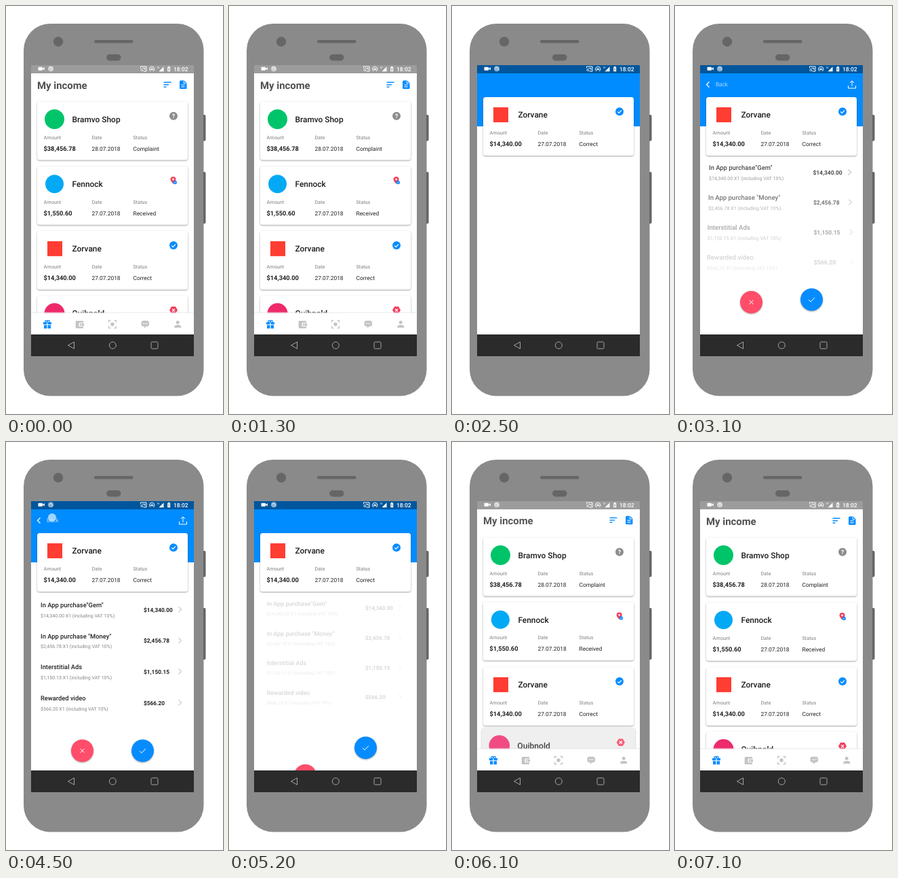
Write an HTML page that moves like this. It is 320 px wide and 600 px high and loops after 7800 ms.

```html
<!DOCTYPE html>
<html lang="en">
<head>
<meta charset="utf-8">
<title>Income app</title>
<style>
  html, body { margin: 0; width: 100%; height: 100%; overflow: hidden; background: #fff; }
  svg { display: block; width: 100%; height: 100%; }
  text { font-family: Roboto, "Noto Sans", sans-serif; text-rendering: geometricPrecision; fill: #222; }
  .shadow { filter: drop-shadow(0 1.1px 1.1px rgba(0, 0, 0, .36)); }
  .heading { font-size: 14.9px; font-weight: 700; fill: #505050; }
  .name { font-size: 11.9px; font-weight: 500; fill: #1c1c1c; }
  .label { font-size: 7.3px; fill: #808080; }
  .amount { font-size: 9.25px; font-weight: 700; }
  .value { font-size: 8.4px; }
  .item { font-size: 9.35px; font-weight: 500; }
  .sub { font-size: 7.05px; fill: #858585; }
  .price { font-size: 8.35px; font-weight: 700; }
</style>
</head>
<body>
<svg viewBox="0 0 320 600">
  <defs><clipPath id="screen"><rect x="37" y="87" width="240" height="428"/></clipPath></defs>

  <rect x="26" y="26" width="265.5" height="547.5" rx="39" fill="#8a8a8a"/>
  <g fill="#666">
    <path d="M291 160h1.5q2 0 2 2v34.500q0 2-2 2H291zM291 244h1.500q2 0 2 2v72q0 2-2 2H291z"/>
    <circle cx="77" cy="52.500" r="7.200"/>
    <rect x="130" y="50" width="57.500" height="4.500" rx="2.250"/>
    <rect x="148" y="71" width="21.500" height="9.500" rx="4.750"/>
  </g>

  <g clip-path="url(#screen)">
    <rect x="37" y="87" width="240" height="428" fill="#fff"/>
    <g id="header">
      <text class="heading" x="46" y="121.500">My income</text>
      <path d="M232.500 112.300h11M232.500 115.700h7.500M232.500 119.100h4" stroke="#0a8cff" stroke-width="1.500"/>
      <path d="M257.500 109.500h5l4 4v7q0 1.500-1.500 1.500h-7.500q-1.500 0-1.500-1.500v-9.500q0-1.500 1.500-1.500z" fill="#0a8cff"/>
      <path d="M258.500 116h5M258.500 118.800h5M262.200 110.500v3.200h3.200" stroke="#fff" fill="none"/>
    </g>
    <g id="list"></g>

    <g id="tabs">
      <path d="M37 451h240" stroke="#e2e2e2"/>
      <rect x="37" y="451.500" width="240" height="33" fill="#fff"/>
      <g fill="#0a8cff">
        <path d="M55 465h5.400v3.200H55zM61.600 465H67v3.200h-5.400zM56 469.200h4.400v5H56zM61.600 469.200H66v5h-4.400z"/>
        <g fill="none" stroke="#0a8cff" stroke-width="1.200">
          <circle cx="59.200" cy="463.800" r="1.500"/>
          <circle cx="62.800" cy="463.800" r="1.500"/>
        </g>
      </g>
      <g fill="#c4c4c4">
        <path d="M104 463h10v2.500h-5q-1.500 0-1.500 1.500v3q0 1.500 1.500 1.500h5v2.500h-10q-1.300 0-1.300-1.300v-8.400q0-1.300 1.300-1.300zM109 466.500h6v4h-6z"/>
        <circle cx="111.200" cy="468.500" r=".9" fill="#fff"/>
        <circle cx="157" cy="468" r="2.700"/>
        <path d="M151.500 465.500v-3h3M159.500 462.500h3v3M162.500 470.500v3h-3M154.500 473.500h-3v-3" fill="none" stroke="#c4c4c4" stroke-width="1.300"/>
        <path d="M203 462.700h4.500q3.700 0 3.700 4.300t-3.700 4.300h-1l-2.500 2.700v-2.700h-1q-3.700 0-3.700-4.300t3.700-4.300z"/>
        <path d="M202 467h1.300M204.600 467h1.300M207.200 467h1.300" stroke="#fff" stroke-width="1.300"/>
        <circle cx="253.200" cy="465.300" r="2.500"/>
        <path d="M248.200 473v-1.300q0-2.700 5-2.700t5 2.700v1.300z"/>
      </g>
    </g>

    <rect id="panel" x="37" y="87" width="240" fill="#008cff"/>
    <g id="detailHeader">
      <path d="M50.500 111.500l-4 4 4 4" fill="none" stroke="#fff" stroke-width="1.200"/>
      <text x="60" y="118.300" font-size="8.200" style="fill:#fff;font-weight:300">Back</text>
      <path d="M255.500 117v4h11v-4M261 118v-8M258 113l3-3 3 3" fill="none" stroke="#fff"/>
    </g>
    <g id="rows"></g>
    <g id="reject" class="shadow">
      <circle cx="112.500" r="16.500" fill="#ff4d6a"/>
      <path d="M109.500-3l6 6M115.500-3l-6 6" stroke="#fff"/>
    </g>
    <g id="accept" class="shadow">
      <circle cx="201.500" r="16.500" fill="#078cff"/>
      <path d="M197 .300l3 3 6-6.300" fill="none" stroke="#fff"/>
    </g>
    <g id="selected"></g>
    <circle id="touch" cx="68" cy="111" r="6" fill="#d5ecff" opacity=".75"/>

    <rect x="37" y="87" width="240" height="12" fill="#000" opacity=".39"/>
    <g fill="#fff">
      <rect x="47.500" y="89.700" width="6.500" height="5" rx=".7"/>
      <path d="M54 92l2.800-2v4.400L54 92.500z"/>
      <circle cx="66" cy="92.300" r="4" opacity=".55"/>
      <path d="M63.500 91.500q2.500-2.500 4.500 0t.5 3" fill="none" stroke="#fff" opacity=".6"/>
      <g fill="none" stroke="#fff" stroke-width="1">
        <path d="M198.500 91v-2h8.500v7h-4M198.500 92.500q3.500 0 3.500 3.500M198.500 94.500q1.500 0 1.500 1.500M201.500 91.500h3.500v2.500"/>
        <path d="M213 96q-3-3.200-.5-5.800 2.700-2.300 5.400 0 2.500 2.600-.5 5.800M213.700 94q-.8-2 1.500-2.300 2.300.3 1.500 2.300"/>
      </g>
      <circle cx="215.200" cy="93.500" r="1"/>
      <path d="M225.500 96.200l7-7v7zM238.200 89.800h1v-1h2v1h1v6.500h-4z"/>
      <text x="223" y="91.800" font-size="4.500" style="fill:#fff">H</text>
      <path d="M240.700 90.700l-1.300 2.300h1.600l-1.300 2.300" fill="none" stroke="#777" stroke-width=".7"/>
      <text x="247" y="95.500" font-size="8.500" style="fill:#fff;font-weight:500">18:02</text>
    </g>

    <rect x="37" y="483" width="240" height="32" fill="#2b2b2b"/>
    <g fill="none" stroke="#a5a5a5">
      <path d="M100.500 494v10l-9-5z" stroke-linejoin="round"/>
      <circle cx="157.300" cy="499" r="5"/>
      <rect x="214" y="494" width="10" height="10" rx="1.500"/>
    </g>
  </g>
</svg>

<script>
const LOOP = 7800, STEP = 100, CENTER = 157;
const CARD_TOP = 140.5, CARD_PITCH = 95.2, DETAIL_TOP = 134;
const ROW_TOP = 243, ROW_PITCH = 45.7;
const $ = id => document.getElementById(id);

const badges = {
  Complaint: `<circle r="6" fill="#8c8c8c"/>
    <text y="3.200" font-size="9" text-anchor="middle" style="fill:#fff;font-weight:700">?</text>`,
  Received: `<path d="M-.5 4.500q-4-4.500-4-6.500a4 4 0 0 1 8 0q0 2-4 6.500z" fill="#f2405f"/>
    <circle cx="-.5" cy="-2" r="1.300" fill="#fff"/><circle cx="2.300" cy="2.500" r="2.700" fill="#0a8cff"/>
    <path d="M1 2.500l1 1 1.700-1.800" fill="none" stroke="#fff" stroke-width=".7"/>`,
  Correct: `<circle r="6" fill="#078cff"/><path d="M-2.800 .2l2 2 3.800-4" fill="none" stroke="#fff" stroke-width="1.200"/>`,
  Rejected: `<path d="M-3-5.200h6l3 5.200-3 5.200h-6l-3-5.200z" fill="#f2405f"/>
    <path d="M-2-2l4 4M2-2l-4 4" stroke="#fff" stroke-width="1.200"/>`
};

const circle = (r, color) => `<circle cx="71.500" cy="26" r="${r}" fill="${color}"/>`;
const square = (size, color) =>
  `<rect x="${72 - size / 2}" y="${26 - size / 2}" width="${size}" height="${size}" fill="${color}"/>`;

const incomes = [
  ['Bramvo Shop', '$38,456.78', '28.07.2018', 'Complaint', circle(14.5, '#00c46a')],
  ['Fennock', '$1,550.60', '27.07.2018', 'Received', circle(13.5, '#03a9f4')],
  ['Zorvane', '$14,340.00', '27.07.2018', 'Correct', square(22, '#ff3d32')],
  ['Quibnold', '$2,120.00', '26.07.2018', 'Rejected', circle(15, '#ee2a6b')]
];

function cardMarkup([name, amount, date, status, logo]) {
  const column = (x, label, value, kind) =>
    `<text class="label" x="${x}" y="55">${label}</text><text class="${kind}" x="${x}" y="72">${value}</text>`;
  return `<rect class="shadow" x="46" width="222" height="86" rx="3.500" fill="#fff"/>${logo}
    <text class="name" x="97.500" y="30.400">${name}</text>
    <g transform="translate(247 21.200)">${badges[status]}</g>
    ${column(55.5, 'Amount', amount, 'amount')}
    ${column(126.5, 'Date', date, 'value')}
    ${column(187.5, 'Status', status, 'value')}`;
}

const purchases = [
  ['In App purchase"Gem"', '$14,340.00'],
  ['In App purchase "Money"', '$2,456.78'],
  ['Interstitial Ads', '$1,150.15'],
  ['Rewarded video', '$566.20']
];

const rowMarkup = ([title, price]) => `<g>
  <text class="item" x="51" y="0">${title}</text>
  <text class="sub" x="51" y="14.700">${price} X1 (including VAT 10%)</text>
  <text class="price" x="203" y="6.600">${price}</text>
  <path d="M254.500-.800l4 4-4 4" fill="none" stroke="#aaa"/></g>`;

$('list').innerHTML = incomes.map((income, i) => i === 2 ? '<g></g>' : `<g>${cardMarkup(income)}</g>`).join('');
$('selected').innerHTML = cardMarkup(incomes[2]);
$('rows').innerHTML = purchases.map(rowMarkup).join('');
const cards = [...$('list').children], rows = [...$('rows').children];

const ramp = (t, start, duration) => Math.min(1, Math.max(0, (t - start) / duration));
const sine = p => (1 - Math.cos(Math.PI * p)) / 2;
const quadOut = p => 1 - (1 - p) ** 2;
const backOut = p => 1 + 5.5 * (p - 1) ** 3 + 4.5 * (p - 1) ** 2;
const backIn = p => p * p * (2.7 * p - 1.7);

function place(node, y, scale = 1, opacity = 1) {
  node.setAttribute('transform', `translate(${CENTER} ${y}) scale(${scale}) translate(${-CENTER} 0)`);
  node.setAttribute('opacity', opacity);
}

function render(t) {
  const returning = t >= 5200;

  const headerIn = returning ? sine(ramp(t, 5400, 800)) : 1 - sine(ramp(t, 1700, 500));
  place($('header'), -20 * (1 - headerIn), 1, headerIn);

  cards.forEach((card, i) => {
    const out = sine(ramp(t, 1700, 200));
    const settled = returning ? sine(ramp(t, 5280 + 102 * i, 800)) : 1 - out;
    const opacity = returning ? sine(ramp(t, 5368 + 102 * i, 580)) : 1 - out;
    place(card, CARD_TOP + CARD_PITCH * i - 21 * (1 - settled), 1 + .07 * (1 - settled), opacity);
    // The shadow shows through a translucent card.
    const grey = Math.round(255 - 44 * Math.sqrt(1 - opacity));
    card.querySelector('rect')?.setAttribute('fill', `rgb(${grey},${grey},${grey})`);
  });

  const closing = sine(ramp(t, 5460, 545));
  place($('tabs'), 33 * (returning ? 1 - closing : sine(ramp(t, 1700, 200))));

  const panelOpen = returning ? 1 - sine(ramp(t, 5450, 545)) : sine(ramp(t, 1700, 700));
  $('panel').setAttribute('height', 90 * panelOpen);

  const lifted = returning ? 1 - closing : quadOut(ramp(t, 1700, 700));
  const listTop = CARD_TOP + 2 * CARD_PITCH;
  place($('selected'), listTop + (DETAIL_TOP - listTop) * lifted);

  $('detailHeader').setAttribute('opacity', sine(ramp(t, 2500, 400)) * (1 - sine(ramp(t, 4600, 400))));

  const leaving = ramp(t, 4600, 660) ** 2, shrink = 1 - .053 * leaving;
  place($('rows'), 193 * (1 - shrink), shrink, 1 - leaving);
  rows.forEach((row, i) => {
    const shown = sine(ramp(t, 2600 + 100 * i, 700));
    place(row, ROW_TOP + ROW_PITCH * i - 8.5 * (1 - shown), 1 + .05 * (1 - shown), shown);
  });

  const button = (id, enter, exit) =>
    place($(id), 504 - 50 * backOut(ramp(t, enter, 800)) + 50 * backIn(ramp(t, exit, 640)));
  button('reject', 2620, 4600);
  button('accept', 2740, 4880);

  $('touch').style.display = t >= 4500 && t < 4700 ? '' : 'none';
}

const origin = performance.now();
function tick() {
  const t = (performance.now() - origin) % LOOP;
  render(Math.floor(t / STEP) * STEP);
  requestAnimationFrame(tick);
}
tick();
</script>
</body>
</html>
```
